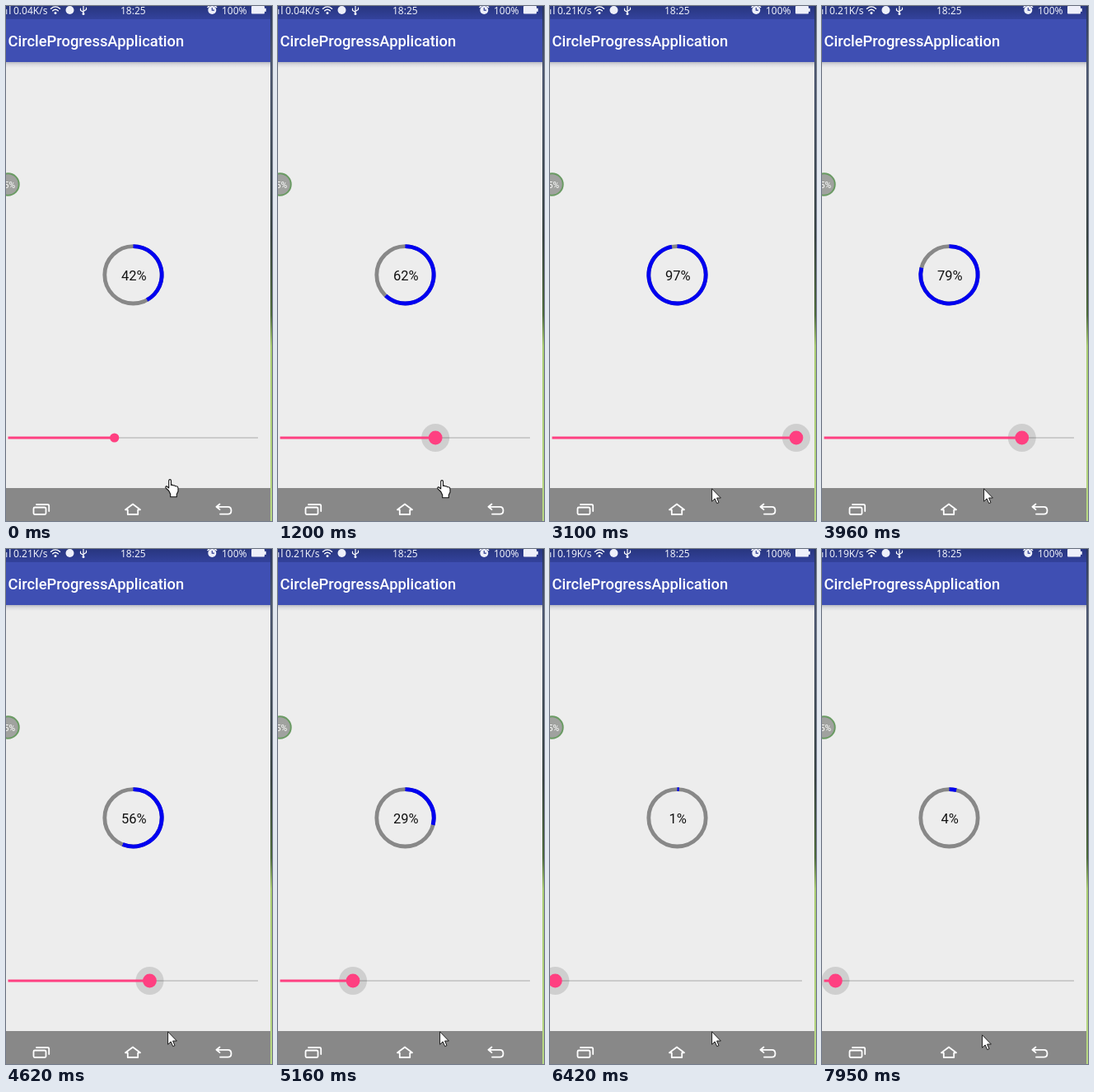
An HTML page for the animation above (8 s loop, 323 by 625 pixels).

```html
<!DOCTYPE html>
<html lang="en">
<head>
<meta charset="utf-8">
<title>Circle progress</title>
<style>
html, body { margin: 0; width: 100%; height: 100%; overflow: hidden; background: #ededed; }
svg { display: block; width: 323px; height: 625px; }
.status { font: 12px "Noto Sans", sans-serif; fill: #eef0fa; }
.title { font: 500 18.35px Roboto, sans-serif; fill: #fff; }
.value { font: 16.5px Roboto, sans-serif; fill: #111; text-anchor: middle; }
.line { fill: none; stroke: #fff; stroke-linejoin: round; stroke-linecap: round; }
</style>
</head>
<body>
<svg viewBox="0 0 323 625">
  <defs>
    <linearGradient id="bar" x1="0" y1="0" x2="0" y2="1">
      <stop offset="0" stop-color="#28367f"/><stop offset="1" stop-color="#33429c"/>
    </linearGradient>
    <linearGradient id="shade" x1="0" y1="0" x2="0" y2="1">
      <stop offset="0" stop-color="#b9bac0"/><stop offset=".45" stop-color="#dcdce0"/><stop offset="1" stop-color="#ededed"/>
    </linearGradient>
    <linearGradient id="edge" x1="0" y1="0" x2="0" y2="1">
      <stop offset="0" stop-color="#27345f"/><stop offset=".12" stop-color="#4b5670"/>
      <stop offset=".45" stop-color="#34403f"/><stop offset=".6" stop-color="#4c6a3a"/>
      <stop offset=".66" stop-color="#a9cc72"/><stop offset="1" stop-color="#b8d884"/>
    </linearGradient>
    <clipPath id="screen"><rect width="321" height="625"/></clipPath>
  </defs>

  <rect width="323" height="625" fill="#ededed"/>
  <rect y="68" width="321" height="7" fill="url(#shade)"/>
  <rect width="321" height="68" fill="#3f4fb3"/>
  <rect width="321" height="16" fill="url(#bar)"/>
  <text class="title" x="2.5" y="49">CircleProgressApplication</text>

  <g class="status">
    <path d="M0 4h1.3v6H0zM4 0h1.5v10H4z" opacity=".75"/>
    <text id="speed" x="9" y="9.7"></text>
    <g class="line" stroke-width="1.4">
      <path d="M54.5 3.2q5.5-4.6 11 0M56.7 5.7q3.3-2.8 6.6 0"/>
      <path d="M94 0V10M90.5 3v2.2L94 7.6M97.5 2v2.2L94 6.4" stroke-width="1.2"/>
    </g>
    <circle cx="60" cy="8.6" r="1.5"/>
    <circle cx="77.5" cy="5" r="5"/>
    <circle cx="94" cy="9.6" r="1.5"/>
    <text x="139" y="9.7">18:25</text>
    <circle cx="250.3" cy="5" r="5"/>
    <path class="line" d="M245 1.5l2-1.5M255.6 1.5l-2-1.5" stroke-width="1.5"/>
    <path d="M250.3 2v3.2h2.7" fill="none" stroke="#303e92" stroke-width="1.2"/>
    <text x="262" y="9.7">100%</text>
    <rect x="298" y="0" width="16" height="9.5" rx="1"/>
    <rect x="314" y="2.8" width="1.8" height="4"/>
  </g>

  <circle cx="2.5" cy="216.5" r="13.2" fill="#a0a29f" stroke="#6a9b63" stroke-width="2"/>
  <text x="-2.5" y="220.5" style="font:10.5px Roboto, sans-serif" fill="#fff">5%</text>

  <circle cx="154.5" cy="326.3" r="34.7" fill="none" stroke="#888" stroke-width="4.8"/>
  <path id="arc" fill="none" stroke="#0000f0" stroke-width="4.8"/>
  <text id="value" class="value" x="155.2" y="332.6"></text>

  <g clip-path="url(#screen)">
    <path d="M3 524H306" stroke="#a9a9a9" stroke-width="1.2"/>
    <circle id="halo" cy="524" r="17" fill="#000" fill-opacity=".125"/>
    <path id="fill" stroke="#ff4081" stroke-width="3"/>
    <circle id="thumb" cy="524" fill="#ff4081"/>
  </g>

  <rect y="585" width="321" height="40" fill="#888"/>
  <g class="line" stroke-width="1.8">
    <rect x="33.5" y="608.5" width="15" height="8.5" rx="1.5"/>
    <path d="M37 605h13.5q1.7 0 1.7 1.7V613"/>
    <path d="M145 611.3l9-6.8 9 6.8h-2.8v5.7h-12.4v-5.7z"/>
    <path d="M259.5 604.5l-4 3.3 4 3.3M256 607.8h13.5q4 0 4 4.4t-4 4.4H260"/>
  </g>
  <rect x="321" width="2" height="625" fill="url(#edge)"/>

  <path id="hand" fill="#fff" stroke="#111" stroke-width="1.1" stroke-linejoin="round"
    d="M4.8 14.5L1 10.8Q.2 9 2 8.8L4.7 11V2Q4.8.6 6.1.6T7.5 2V7.5Q8.8 6.6 10.1 8Q11.5 7.2 12.7 8.8Q15.8 8.2 16 11.2V15L14.3 18.5V21.8H6.7V18.6Z"/>
  <path id="arrow" fill="#fff" stroke="#1c1c1c" stroke-width="1" stroke-linejoin="round"
    d="M.6.8V16.2L4.2 12.9L6.7 18.6L9 17.6L6.6 12H11.4Z"/>
</svg>
<script>
const el = id => document.getElementById(id);
const set = (id, attrs) => {
  for (const k in attrs) el(id).setAttribute(k, attrs[k]);
};

const LOOP = 8000;
// Moments at which the screen refreshes
const ticks = [0, 120, 570, 720, 850, 970, 1080, 1200, 1350, 1500, 1620, 1750, 1880, 2000, 2130, 2250,
  2400, 2550, 2700, 2850, 2970, 3120, 3270, 3390, 3530, 3810, 3960, 4100, 4230, 4370, 4500, 4640, 4770,
  4890, 5030, 5160, 5320, 5440, 5580, 5700, 5820, 5970, 6120, 6270, 6420, 7390, 7520, 7950];
// [time, percent]
const path = [[0, 42.4], [570, 42.4], [1200, 62], [1500, 67.6], [2250, 84.3], [2550, 90.6], [3120, 100],
  [3390, 100], [3530, 99], [3960, 79], [5160, 29], [5820, 11.5], [6420, 1.1], [7520, 1.1], [7950, 4.4]];
// [time, cursor, x, y]
const cursors = [[0, "hand", 193, 574], [120, "hand", 193, 575], [1880, "hand", 193, 577],
  [2400, "hand", 193, 579], [2850, "arrow", 196, 585], [7390, "arrow", 195, 587], [7520, "arrow", 194, 589]];
const speeds = [[0, "0.04K/s"], [2400, "0.21K/s"], [6120, "0.19K/s"]];

const latest = (list, t) => list.filter(item => item[0] <= t).pop();

function percentAt(t) {
  const i = path.findIndex(p => p[0] >= t);
  if (i < 1) return path[i < 0 ? path.length - 1 : 0][1];
  const [t0, a] = path[i - 1], [t1, b] = path[i];
  return a + (b - a) * (t - t0) / (t1 - t0);
}

function arcPath(percent) {
  const a = Math.min(percent, 99.99) / 50 * Math.PI, r = 34.7, cx = 154.5, cy = 326.3;
  return `M${cx} ${cy - r}A${r} ${r} 0 ${percent > 50 ? 1 : 0} 1 ${cx + r * Math.sin(a)} ${cy - r * Math.cos(a)}`;
}

function draw(time) {
  const t = ticks.filter(k => k <= time).pop();
  const p = percentAt(t), whole = Math.floor(p + 0.001), x = 3 + 3.035 * p;
  const press = Math.max(0, Math.min(1, (t - 470) / 250));
  set("arc", { d: arcPath(whole) });
  el("value").textContent = whole + "%";
  set("fill", { d: `M2.5 524H${x}` });
  set("thumb", { cx: x, r: 5.6 + 2.8 * press });
  set("halo", { cx: x, opacity: press });
  el("speed").textContent = latest(speeds, t)[1];
  const [, shape, cx, cy] = latest(cursors, t);
  for (const id of ["hand", "arrow"])
    set(id, { visibility: id === shape ? "visible" : "hidden", transform: `translate(${cx} ${cy})` });
}

function loop() {
  draw(performance.now() % LOOP);
  requestAnimationFrame(loop);
}
loop();
</script>
</body>
</html>
```
